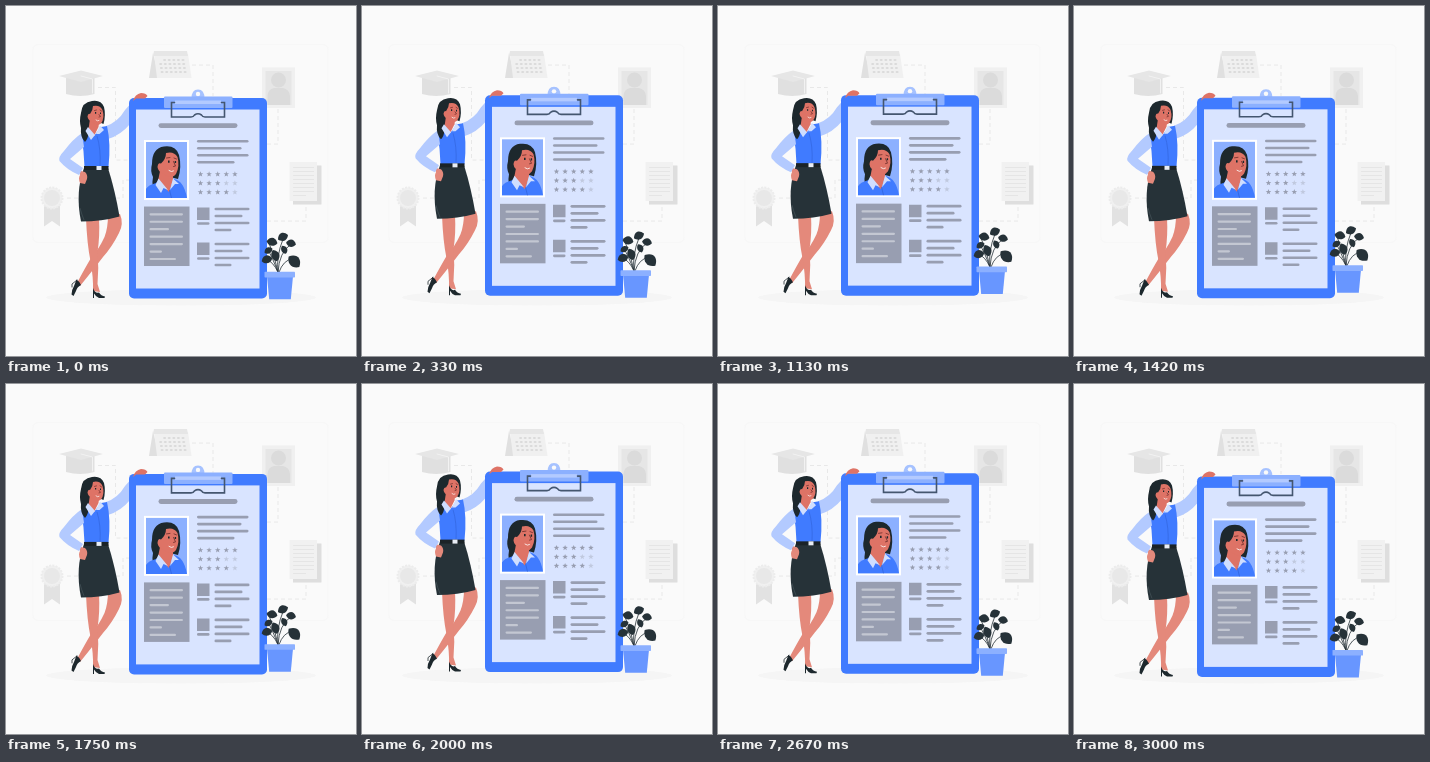
An HTML page that plays this animation: 350x350 px, repeating every 3.04 s.

```html
<!DOCTYPE html>
<html lang="en">
<head>
<meta charset="utf-8">
<title>Resume clipboard</title>
<style>
  html, body { margin: 0; width: 100%; height: 100%; overflow: hidden; background: #fafafa; }
  svg { display: block; width: 100%; height: 100%; }
  .skin { fill: #e4897b; }
  .face { fill: #de7366; }
  .dark { fill: #263238; }
  .hair { fill: #1d282d; }
  .blue { fill: #407bff; }
  .pale { fill: #b3caff; }
  .clip { fill: #8cb0ff; }
  .grey { fill: #989eb1; }
  .line { fill: none; stroke-linecap: round; }
  .dash { fill: none; stroke: #e8e8e8; stroke-width: 1; stroke-dasharray: 4 3; }
</style>
</head>
<body>
<svg viewBox="0 0 350 350">
  <rect x="27" y="38.500" width="295" height="198" rx="5" fill="none" stroke="#f7f7f7"/>
  <ellipse cx="175" cy="291.500" rx="135" ry="8" fill="#f5f5f5"/>

  <g id="backdrop">
    <path class="dash" d="M92 81.500H109.500V154H124M186 59H207V90M272 103V138H261M300 201V215H261M61 192H117V174H124"/>
    <!-- graduation cap -->
    <path fill="#e0e0e0" d="M60 72H88.500V88Q74 92 60 88Z"/>
    <path fill="#e6e6e6" d="M53 70L75 64.500L97 70L75 76Z"/>
    <path class="line" stroke="#f2f2f2" d="M75 70L86.500 73V87"/>
    <!-- calendar -->
    <path fill="#e0e0e0" d="M147 47L143 72H153Z"/>
    <path fill="#f0f0f0" d="M148 48H182L185.500 72H151Z"/>
    <path fill="#e6e6e6" d="M148 45H181L182 50H147Z"/>
    <!-- portrait card -->
    <rect x="256" y="61.500" width="33" height="40.500" fill="#f0f0f0"/>
    <rect x="259.500" y="65" width="26" height="34" fill="#e6e6e6"/>
    <circle cx="272.500" cy="74" r="7.500" fill="#dbdbdb"/>
    <path fill="#dbdbdb" d="M261.500 99V90Q262 83 268 82H277Q283 83 284 90V99Z"/>
    <!-- document -->
    <path fill="#dedede" d="M287 159.500H315.500V198.500H287Z"/>
    <path fill="#f1f1f1" d="M283.500 156H311V195H283.500Z"/>
    <!-- medal -->
    <path fill="#e2e2e2" d="M38 200H54V220.500L46 215L38 220.500Z"/>
    <circle cx="46" cy="192" r="10.500" fill="#f0f0f0" stroke="#ececec" stroke-width="2" stroke-dasharray="2 1.300"/>
    <circle cx="46" cy="192" r="8" fill="#e8e8e8"/>
  </g>

  <g id="main">
    <g id="woman">
      <!-- crossed legs and shoes -->
      <path class="skin" d="M102 209L114 208Q118 218 113 227Q106 241 97 251Q87 264 74 280L71 277Q79 262 85 252Q93 243 98.500 231Q102 222 102 209Z"/>
      <path class="hair" d="M70.500 273.500Q73 275 75 279Q71 281 70 285L67.500 290L65.500 288.500Q65.500 284 68 280Z"/>
      <path class="line" stroke="#1d282d" stroke-width=".8" d="M71 274L66 278V281"/>
      <path class="skin" d="M80 212H93Q94 230 91.500 246Q93 262 91.500 278L94 286L87 285Q87.500 272 84.500 255Q81 238 80 212Z"/>
      <path class="hair" d="M87 282Q89 288 93 286.500Q95 290 99 290.500L98.500 292H93Q90 291 88 287.500V292H87Z"/>
      <!-- raised arm, skirt and shirt -->
      <path class="pale" d="M100 120Q112 116 119 104L128 94L132 99L124 118Q115 129 102 133Z"/>
      <path class="dark" d="M78 162H102Q109 184 113.500 210.500Q96 215.500 75 215.500Q69 186 78 162Z"/>
      <path fill="none" stroke="#45535a" stroke-width=".7" d="M74 202Q75.500 208 78 214"/>
      <path class="blue" d="M82 122L88 130L95 121L101 120Q105 137 102.500 161H78.500Q78 145 75.500 130Q77 125 82 122Z"/>
      <path fill="none" stroke="#2f62d8" stroke-width=".6" d="M91 130Q95 143 94 160"/>
      <path fill="#1b2327" d="M78 160H102.500V164H78Z"/>
      <path fill="#e8edf5" d="M90.500 160H95.500V164H90.500Z"/>
      <!-- arm on hip -->
      <path class="skin" d="M73 164.500L79 166Q82 169 81 173L79 178L74 177Q72 172 74 169Z"/>
      <path class="pale" d="M76 127Q67 133 58 145Q52 151 53.500 155Q61 164 73 169L77 162L64 153L78 141Z"/>
      <!-- head -->
      <path class="hair" d="M75 107Q76 96 86 95Q95 93.500 98 101Q100 109 97.500 118L88 114Q83 121 82.500 127Q82 133 79 136Q74 131 75 122Q73 115 75 107Z"/>
      <path class="face" d="M84 113L93 117L92.500 121L88 130L82.500 123Z"/>
      <path class="face" d="M84 108Q87 104 87 100Q94 98.500 96.500 104Q99 112 95 117.500Q91 121 86 116Q82 114 81.500 110.500Q82 107 84 108Z"/>
      <path fill="#cfdeff" d="M82 121L89 129L85 134L79.500 125ZM94 119.500L98 124L93.500 128L90 128Z"/>
      <g class="line" stroke="#6c2c2a" stroke-width=".7">
        <path d="M88.500 104.500L90.500 104M94 104L95.500 105M93 108.500L94.500 110.500L93 111"/>
        <path stroke="#fff" d="M90 114Q91.500 115.500 93 114.500"/>
      </g>
      <path class="hair" d="M89 106h1.200v1.700h-1.200zM94 106.500h1v1.600h-1z"/>
    </g>

    <g id="board">
      <path fill="#a6c2ff" d="M182 92.500H185.500Q185.500 83.500 192 83.500T198.500 92.500Z"/>
      <circle cx="192" cy="88" r="2.200" fill="#fafafa"/>
      <rect class="blue" x="123" y="92" width="138" height="200.500" rx="5"/>
      <rect x="130" y="103.500" width="123.500" height="179" fill="#d9e4ff"/>
      <path class="face" d="M127 95Q129 88 135 87Q140 87 141.500 90L139 92.500H130Z"/>
      <rect class="clip" x="158" y="90.500" width="68.500" height="11.500" rx="1"/>
      <rect class="pale" x="169" y="94.500" width="46" height="3.500"/>
      <path class="line" stroke="#44566f" stroke-width="1.600" d="M168.500 96.500H165.500V111H185Q187.500 111 188.500 109Q192 106.500 195.500 109Q196.500 111 199 111H218.500V96.500H215.500"/>
      <rect class="grey" x="152.500" y="117.200" width="79" height="4.800" rx="2.400"/>

      <!-- profile picture -->
      <rect x="138" y="134" width="45" height="60" fill="#fff"/>
      <rect class="clip" x="140" y="136" width="41" height="56"/>
      <path class="hair" d="M146 158Q146 142 158 140.500Q170 139 173 149Q176 161 172 173L160 170L155 178Q155 186 150 189Q145 181 147 171Q144 165 146 158Z"/>
      <path class="blue" d="M140 192V183Q142 179 150 177L153 174L163 185L168 173Q178 175 181 192Z"/>
      <path class="face" d="M154 165L167 170V174L163 186L152 175Z"/>
      <path class="face" d="M155 157.500Q160 153 160 147Q168 145 171.500 151Q174 160 170 168Q166 174 158 168Q152 166 151.500 161Q152 156 155 157.500Z"/>
      <path fill="#cfdeff" d="M152.500 172.500L162 184L157.500 182L155 187L149.500 179ZM167 172.500L173 178L169 178L164 184Z"/>
      <path fill="none" stroke="#2f62d8" stroke-width=".7" d="M163.500 184L165.500 192"/>
      <g class="line" stroke="#6c2c2a" stroke-width=".8">
        <path d="M160.500 152L164 151.500M168 152L170.500 153M167.500 155.500L169.500 160L167.500 160.500"/>
        <path stroke="#fff" d="M163 164.500Q165.500 166.500 167.500 165"/>
      </g>
      <path class="hair" d="M162 154.500h1.600v2.200h-1.600zM168.700 155h1.400v2.100h-1.400z"/>

      <rect class="grey" x="138" y="200.500" width="45.500" height="59.500"/>
      <path class="grey" d="M191 201.500h12.500v12.500h-12.500zM191 236.500h12.500v12.500h-12.500z"/>
    </g>
  </g>

  <g id="plant">
    <path class="line" stroke="#263238" stroke-width=".8" d="M272 266Q270 250 277 233M272 266Q269 250 263 237M272 266Q273 246 285 238M272 266Q267 255 260 253M273 266Q277 254 287 252M272 266Q266 250 262 244"/>
    <path fill="#6896ff" d="M261 270H287L284.800 293H263.200Z"/>
    <rect class="clip" x="258.500" y="265.500" width="30.500" height="5.700" rx=".7"/>
  </g>
</svg>
<script>
const $ = id => document.getElementById(id);

function add(parent, d, attrs) {
  const el = document.createElementNS("http://www.w3.org/2000/svg", "path");
  el.setAttribute("d", d);
  for (const k in attrs) el.setAttribute(k, attrs[k]);
  $(parent).append(el);
}

// Rounded rule from x1 to x2, caps included.
function rule(parent, x1, x2, y, stroke = "#989eb1", width = 2.6) {
  const cap = width / 2;
  add(parent, `M${x1 + cap} ${y}H${x2 - cap}`, { class: "line", stroke, "stroke-width": width });
}

function star(x, y, fill) {
  let d = "";
  for (let i = 0; i < 10; i++) {
    const r = i % 2 ? 1.2 : 2.9, a = i * Math.PI / 5;
    d += `${i ? "L" : "M"}${x + r * Math.sin(a)} ${y - r * Math.cos(a)}`;
  }
  add("board", d + "Z", { fill });
}

function leaf(x, y, length, width, angle) {
  const h = length / 2;
  add("plant", `M${-h} 0C${-h / 2} ${-width} ${h / 2} ${-width} ${h} 0C${h / 2} ${width * .8} ${-h / 2} ${width * .8} ${-h} 0Z`,
    { class: "dark", transform: `translate(${x} ${y}) rotate(${angle})` });
}

// Calendar days and document text
for (let row = 0; row < 4; row++)
  for (let col = row ? 0 : 1; col < 6; col++)
    rule("backdrop", 152.5 + col * 4.6 + row * .7, 155.5 + col * 4.6 + row * .7, 54 + row * 4, "#dbdbdb", 2.2);
for (let i = 0; i < 8; i++)
  rule("backdrop", 287, i == 7 ? 300 : 308, 161.5 + i * 4, "#e5e5e5", 1);

// Resume text
[242.5, 235.5, 242.5, 228.5].forEach((x, i) => rule("board", 191, x, 135.2 + i * 7));
[5, 3, 4].forEach((score, row) => {
  for (let i = 0; i < 5; i++)
    star(194.5 + i * 8.6, 168.2 + row * 9, i < score ? "#989eb1" : "#c0c9df");
});
[177, 177, 163, 177, 177, 156, 170].forEach((x, i) =>
  rule("board", 143.5, x, 208.3 + i * 7.45, "#c3c7d2", 2.2));
for (const y of [203, 238]) {
  rule("board", 191, 203.5, y + 14.5);
  [243.5, 236.5, 243.5, 225.5].forEach((x, i) => rule("board", 208.5, x, y + i * 7));
}

[
  [277, 231, 11, 6, -25], [266, 236, 11, 6, 10], [285, 237.5, 10, 5.5, 10],
  [278, 243.5, 9, 4.5, 65], [262.5, 244.5, 9, 4.5, -30], [261, 253.5, 11, 6, -15],
  [269, 249.5, 12, 6, 70], [288, 255.5, 15, 8, 45]
].forEach(args => leaf(...args));

const LOOP = 3040, FRAMES = 73, REST = 0.4, start = performance.now();

// Linear bob over one cycle: up 7 units and back down.
const bob = cycle => REST - 7 * (1 - Math.abs(1 - 2 * (cycle % 1)));
const shift = (id, y) => $(id).setAttribute("transform", `translate(0 ${y})`);

function draw() {
  const phase = (performance.now() - start) % LOOP / LOOP;
  const step = (Math.floor(phase * FRAMES) + 1) / FRAMES;
  shift("main", bob(step * 2));
  shift("plant", bob(step));
  requestAnimationFrame(draw);
}
draw();
</script>
</body>
</html>
```
